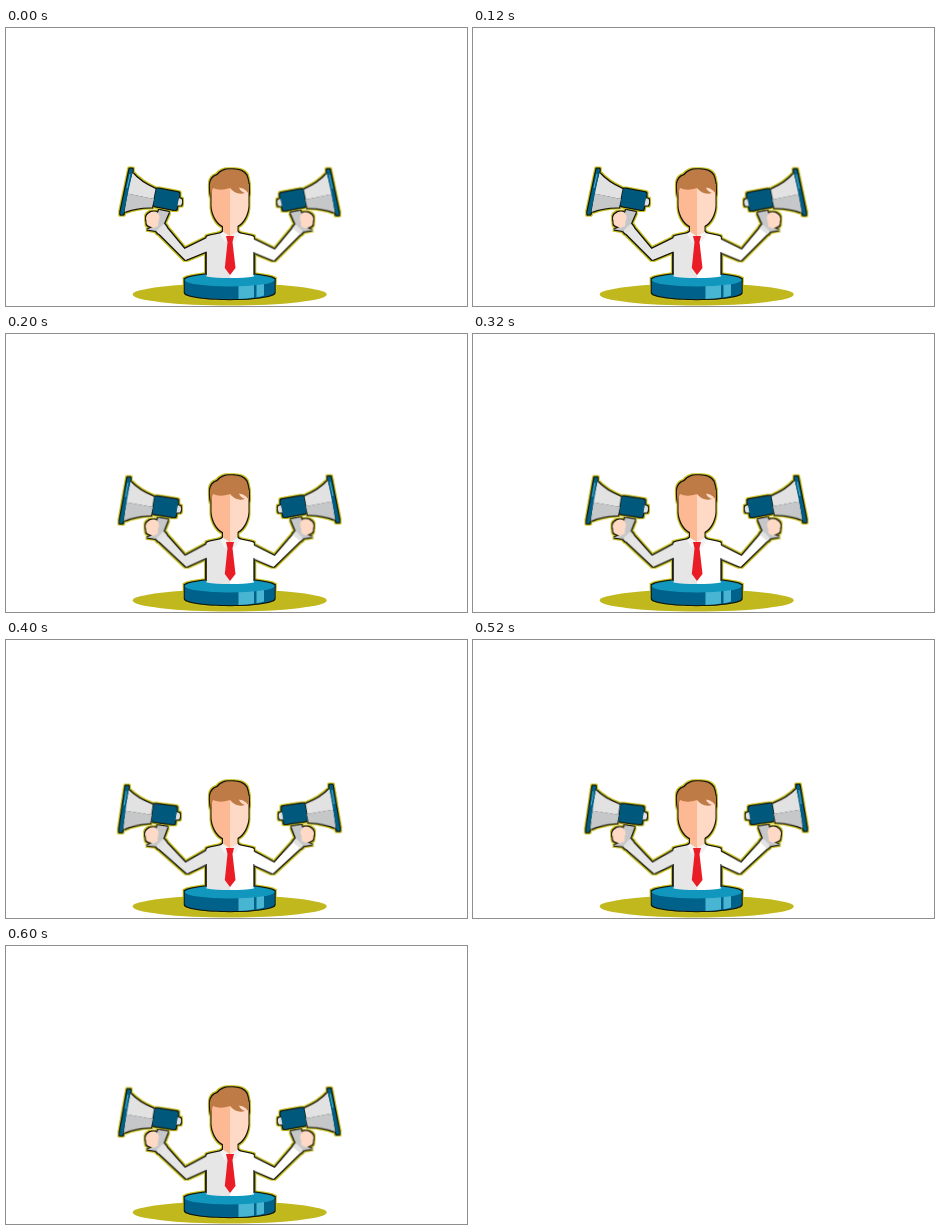
Write an HTML page that moves like this. It is 461 px wide and 278 px high and loops after 0.8 s.

```html
<!DOCTYPE html>
<html lang="en">
<head>
<meta charset="utf-8">
<title>Megaphone man</title>
<style>
  html, body { margin: 0; width: 100%; height: 100%; overflow: hidden; background: #fff; }
  svg { display: block; width: 100vw; height: 100vh; }
  .blue { fill: #00597c; }
  .glint { fill: #48b6d3; }
  .light { fill: #e2e2e2; }
  .grey { fill: #c6c7c9; }
  .pale { fill: #fed9c5; }
  .peach { fill: #fdb894; }
  /* each arm swings around its shoulder in held poses */
  .arm { transform-origin: 205px 207px; animation: .8s step-end infinite; }
  .left { fill: #e6e6e6; animation-name: left; }
  .right { fill: #fff; animation-name: right; }
  @keyframes left {
    0% { transform: rotate(0deg); }
    25%, 75% { transform: rotate(-1.9deg); }
    50% { transform: rotate(-3.6deg); }
  }
  @keyframes right {
    0% { transform: rotate(0deg); }
    25%, 75% { transform: rotate(-.8deg); }
    50% { transform: rotate(-2.4deg); }
  }
</style>
</head>
<body>
<svg viewBox="0 0 461 278" preserveAspectRatio="none">
  <defs>
    <filter id="outline" filterUnits="userSpaceOnUse" x="0" y="0" width="461" height="278" color-interpolation-filters="sRGB">
      <feMorphology in="SourceAlpha" operator="dilate" radius="2" result="wide"/>
      <feFlood flood-color="#c6be1c"/>
      <feComposite in2="wide" operator="in" result="glow"/>
      <feMorphology in="SourceAlpha" operator="dilate" radius="1" result="thin"/>
      <feFlood flood-color="#15150a"/>
      <feComposite in2="thin" operator="in" result="line"/>
      <feMerge>
        <feMergeNode in="glow"/>
        <feMergeNode in="line"/>
        <feMergeNode in="SourceGraphic"/>
      </feMerge>
    </filter>

    <g id="arm">
      <path d="M151 203.500L158.500 197L178.500 221L204 208.500V222L179.500 232Z"/>
      <path class="grey" d="M153 182L163 184L156 200L150 203L141 201.500L147 199Z"/>
      <path class="light" d="M150 203L158 195.500L161 199.500L153 206Z"/>
      <path class="pale" d="M142 186Q147 182 151.500 184.500Q155 189 152.500 193L152 198L147.500 200L143 198Q140 197 140.500 193Q139 189 142 186Z"/>
      <path class="light" d="M126.500 145Q134 154 149.500 161L147.500 171L121 165.500Z"/>
      <path class="grey" d="M121.500 165.500L148 171L146 179.500Q131 179 118.500 184Z"/>
      <path d="M125 142.300L116 185" stroke="#005f86" stroke-width="3.600" stroke-linecap="round" fill="none"/>
      <path d="M124 146L121 160" stroke="#48b6d3" stroke-width="1" fill="none"/>
      <path class="light" d="M172.500 170L175.500 171Q177 174 175 177.500L171 177.500Z"/>
      <path class="blue" d="M152 160.500L172 164.300Q174 165 173.600 167L170.800 180.500Q170.300 182.400 168.500 182L149 178.300Q147 178 147.500 176L150 162Q150.500 160 152 160.500Z"/>
    </g>
  </defs>

  <ellipse cx="223.700" cy="266.500" rx="97" ry="11" fill="#c0b81c"/>

  <g filter="url(#outline)">
    <g class="arm left"><use href="#arm"/></g>
    <g transform="matrix(-1 0 0 1 447.400 .6)">
      <g class="arm right"><use href="#arm"/></g>
    </g>

    <!-- podium -->
    <path fill="#00628a" d="M178.700 251V264C179 273.500 268.500 273.500 268.700 264V251Z"/>
    <path class="glint" d="M232.500 256H248V269.500Q241 270.700 232.500 271ZM250.500 256H258V267.400Q255 268.500 250.500 269.200Z"/>
    <ellipse cx="223.700" cy="252" rx="45" ry="6.500" fill="#1197bd"/>

    <!-- shirt and tie -->
    <path fill="#e6e6e6" d="M200.500 248.500V209Q201 208 204 207.500L216 205H224V250Q210 250 200.500 248.500Z"/>
    <path fill="#fff" d="M224 205H232L244 207.500Q247.500 208 247.800 209V248.500Q238 250 224 250Z"/>
    <path d="M200.500 224V247M247.800 224V247" stroke="#33332b" stroke-width=".9"/>
    <path class="peach" d="M217 190H224V209L217 204Z"/>
    <path class="pale" d="M224 190H231.500V204L224 209Z"/>
    <path fill="#f3f3f3" d="M217 203.500L224 208.500L219 214L214 206ZM231.500 203.500L224 208.500L229 214L234 206Z"/>
    <path fill="#ea1c26" d="M220 208H228L226.500 214L229.500 240L224 247L218.800 240L221.500 214Z"/>

    <!-- head -->
    <path class="peach" d="M205.500 156V178C206.500 190 214 200 224 200V156Z"/>
    <path class="pale" d="M242.500 156V178C241.500 190 234 200 224 200V156Z"/>
    <path fill="#be7b46" d="M205 169Q203.500 162 204 156Q205 149 211.500 147Q216 141.300 224 141.300Q236 140.500 240.500 147.500Q243.500 155 243 168Q242 161 233 159.500Q234 163 239 165Q230 167.500 224 160Q214 163.500 207 160Q205.500 163 205 169Z"/>
  </g>
</svg>
</body>
</html>
```
